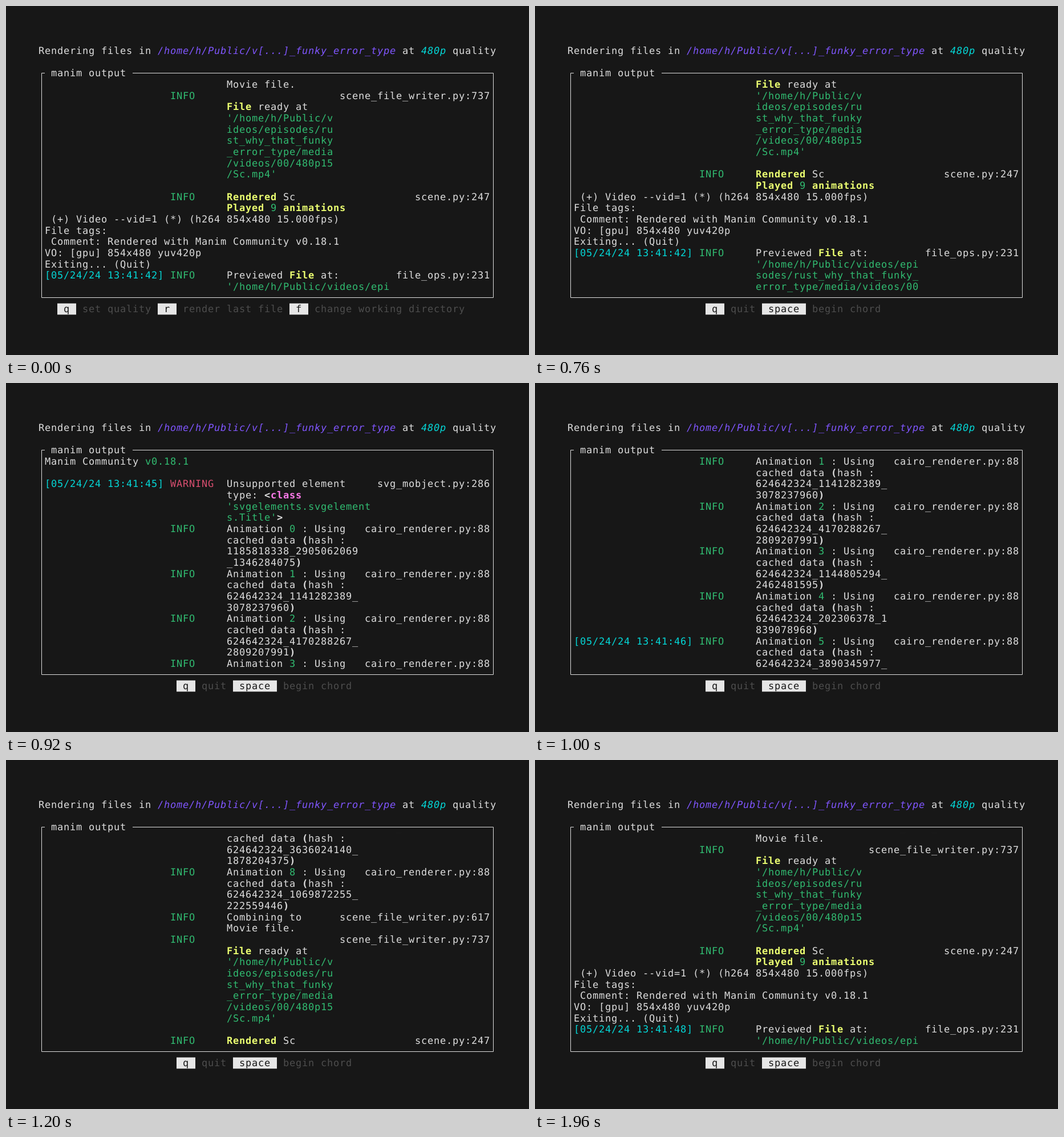
These frames come from a looping animation (917x611 px, 4.24 s). An HTML page:

```html
<!DOCTYPE html>
<html lang="en">
<head>
<meta charset="utf-8">
<title>Terminal render log</title>
<style>
  html, body { margin: 0; width: 100%; height: 100%; overflow: hidden; background: #171717; }
  #stage { display: block; width: 100vw; height: 100vh; }
  text {
    font: 17px "DejaVu Sans Mono", monospace;
    letter-spacing: .766px;
    white-space: pre;
    text-rendering: geometricPrecision;
    fill: #ddd;
  }
  .frame { fill: none; stroke: #ddd; }
  .key { fill: #e6e6e6; }
  .k { fill: #171717; }
  .d { fill: #4d4d4d; }
  .g { fill: #31bb71; }
  .c { fill: #04d7d7; }
  .r { fill: #d74e6f; }
  .b { font-weight: bold; }
  .y { fill: #ebff71; font-weight: bold; }
  .m { fill: #ff7aea; font-weight: bold; }
  .p { fill: #8056ff; font-style: italic; }
  .q { fill: #04d7d7; font-style: italic; }
</style>
</head>
<body>
<svg id="stage" viewBox="0 0 917 611"></svg>
<script>
const LOOP = 4240;
const LEFT = 57, TOP = 68.33, CELL = 11, ROW = 19.667, BASELINE = 15.7;
const VIEW_ROW = 3, VIEW_ROWS = 19;
const stage = document.getElementById('stage');

function add(parent, tag, attrs = {}, text = '') {
  const node = document.createElementNS('http://www.w3.org/2000/svg', tag);
  for (const name in attrs) node.setAttribute(name, attrs[name]);
  node.textContent = text;
  return parent.appendChild(node);
}

// Writes a line on the character grid; {x|words} gives words the class x.
function write(parent, col, row, line) {
  line.split(/(\{\w\|.*?\})/).forEach(part => {
    const [, style = '', body = part] = part.match(/^\{(\w)\|(.*)\}$/) || [];
    const words = body.trimStart();
    if (words) {
      add(parent, 'text', {
        class: style,
        x: LEFT + CELL * (col + body.length - words.length),
        y: TOP + ROW * row + BASELINE
      }, words);
    }
    col += body.length;
  });
}

function writeKeys(parent, col, pairs) {
  for (const [key, hint] of pairs) {
    const width = key.length + 2;
    add(parent, 'rect', {
      class: 'key', x: LEFT + CELL * col, y: TOP + ROW * 23, width: CELL * width, height: ROW
    });
    write(parent, col, 23, ` {k|${key}}  {d|${hint}}`);
    col += width + hint.length + 2;
  }
}

// Steps are [time in ms, style]; each holds until the next one.
function play(node, steps) {
  const frames = steps.map(([time, style]) => ({ ...style, offset: time / LOOP, easing: 'step-end' }));
  frames.push({ ...steps[steps.length - 1][1], offset: 1 });
  node.animate(frames, { duration: LOOP, iterations: Infinity });
}

const log = [];
const plain = (...lines) => lines.forEach(line => log.push([[1, line]]));

function entry(lines, { level = '{g|INFO}', file = '', time = '' } = {}) {
  lines.forEach((line, i) => {
    const parts = [[30, line]];
    if (i === 0) {
      parts.push([21, level], [72 - file.length, file]);
      if (time) parts.push([1, `{c|[05/24/24 ${time}]}`]);
    }
    log.push(parts);
  });
}

const green = line => `{g|${line}}`;

function cached(number, hashStart, hashEnd, time) {
  entry([`Animation {g|${number}} : Using`, 'cached data {b|(}hash :', hashStart, `${hashEnd}{b|)}`],
    { file: 'cairo_renderer.py:88', time });
}

function finish(time) {
  entry(['Combining to', 'Movie file.'], { file: 'scene_file_writer.py:617' });
  entry(['', '{y|File} ready at', ...[
    "'/home/h/Public/v", 'ideos/episodes/ru', 'st_why_that_funky',
    '_error_type/media', '/videos/00/480p15', "/Sc.mp4'"
  ].map(green), ''], { file: 'scene_file_writer.py:737' });
  entry(['{y|Rendered} Sc', '{y|Played} {g|9} {y|animations}'], { file: 'scene.py:247' });
  plain(
    ' (+) Video --vid=1 (*) (h264 854x480 15.000fps)',
    'File tags:',
    ' Comment: Rendered with Manim Community v0.18.1',
    'VO: [gpu] 854x480 yuv420p',
    'Exiting... (Quit)'
  );
  entry(['Previewed {y|File} at:', ...[
    "'/home/h/Public/videos/epi", 'sodes/rust_why_that_funky_',
    'error_type/media/videos/00', "/480p15/Sc.mp4'"
  ].map(green)], { file: 'file_ops.py:231', time });
}

finish('13:41:42');
log.shift(); // the view starts on the second line of this run
plain('', 'manim exited with code: 0', 'Manim Community {g|v0.18.1}', '');
entry(['Unsupported element', 'type: {b|<}{m|class}', "{g|'svgelements.svgelement}", "{g|s.Title'}{b|>}"],
  { level: '{r|WARNING}', file: 'svg_mobject.py:286', time: '13:41:45' });
cached(0, '1185818338_2905062069', '_1346284075');
cached(1, '624642324_1141282389_', '3078237960');
cached(2, '624642324_4170288267_', '2809207991');
cached(3, '624642324_1144805294_', '2462481595');
cached(4, '624642324_202306378_1', '839078968');
cached(5, '624642324_3890345977_', '1530796214', '13:41:46');
cached(6, '624642324_2718450936_', '1962043587');
cached(7, '624642324_3636024140_', '1878204375');
cached(8, '624642324_1069872255_', '222559446');
finish('13:41:48');

write(stage, 0, 0,
  'Rendering files in {p|/home/h/Public/v[...]_funky_error_type} at {q|480p} quality');
add(stage, 'path', { class: 'frame', d: 'M68 117.5H62.5V510.5H854.5V117.5H222' });
write(stage, 2, 2, 'manim output');

// The nested svg clips the log to the panel.
const view = add(stage, 'svg', {
  x: 0, y: TOP + ROW * VIEW_ROW, width: 917, height: ROW * VIEW_ROWS
});
const scroller = add(add(view, 'g', { transform: `translate(0 ${-TOP})` }), 'g');
log.forEach((parts, row) => parts.forEach(([col, line]) => write(scroller, col, row, line)));

const scrollSteps = [
  [0, 0], [760, 2], [800, 8], [840, 14], [880, 19], [920, 24], [1000, 34],
  [1040, 39], [1080, 44], [1120, 49], [1200, 59], [1760, 65], [1960, 67]
];
play(scroller, scrollSteps.map(([time, line]) =>
  [time, { transform: `translateY(${-line * ROW}px)` }]));

const chordKeys = add(stage, 'g');
writeKeys(chordKeys, 3, [
  ['q', 'set quality'], ['r', 'render last file'], ['f', 'change working directory']
]);
const mainKeys = add(stage, 'g');
writeKeys(mainKeys, 22, [['q', 'quit'], ['space', 'begin chord']]);
play(chordKeys, [[0, { opacity: 1 }], [360, { opacity: 0 }]]);
play(mainKeys, [[0, { opacity: 0 }], [360, { opacity: 1 }]]);
</script>
</body>
</html>
```
